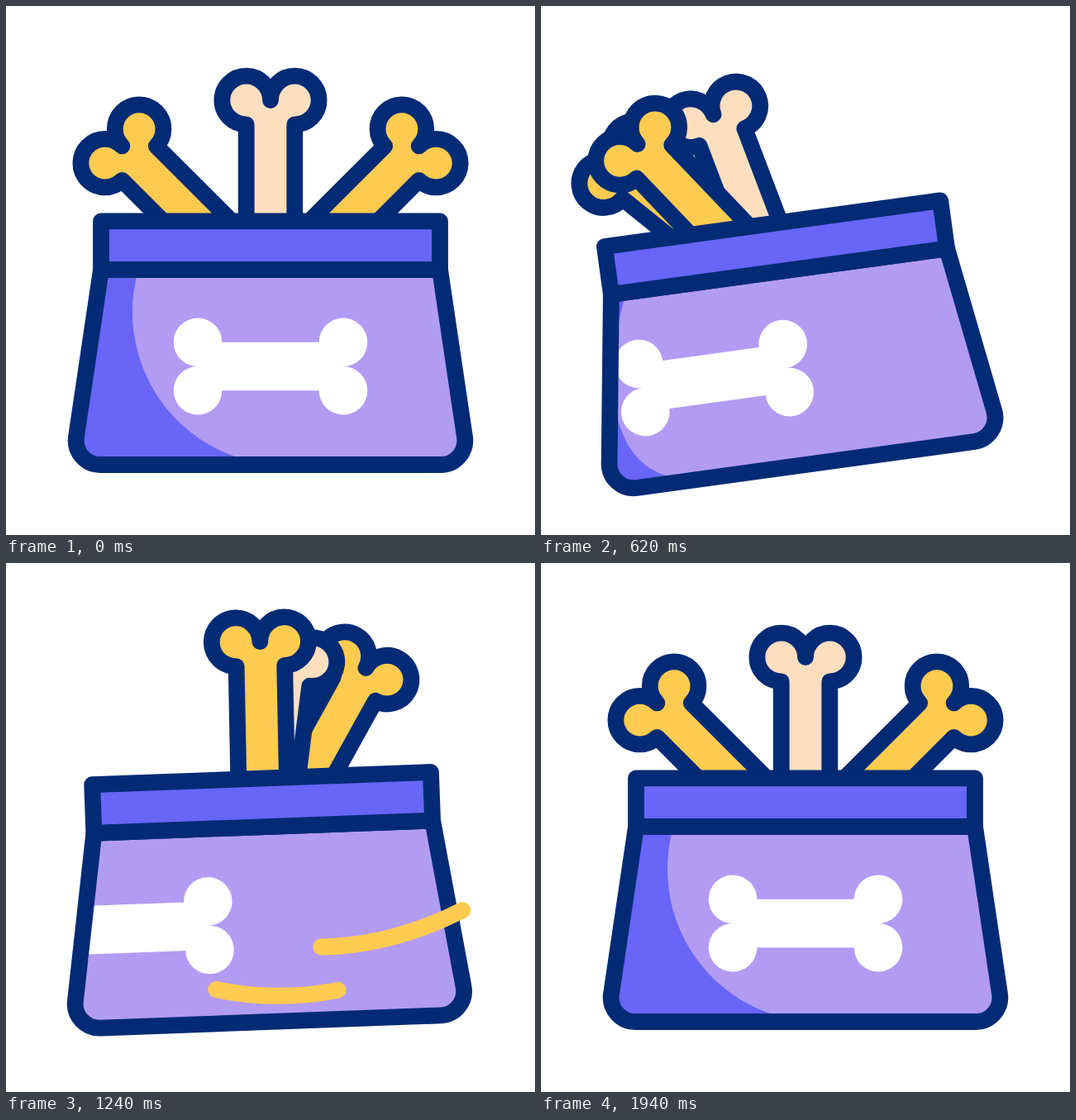
An HTML page that plays this animation: 640x640 px, repeating every 2.4 s.

```html
<!DOCTYPE html>
<html lang="en">
<head>
<meta charset="utf-8">
<title>Treat bag</title>
<style>
  html, body { margin: 0; width: 100%; height: 100%; overflow: hidden; background: #fff; }
  svg { display: block; width: 100vw; height: 100vh; }
  .line { stroke: #032b75; stroke-width: 19.8; stroke-linejoin: round; }
  .swoosh { fill: none; stroke: #fdcb50; stroke-width: 20; stroke-linecap: round; }
</style>
</head>
<body>
<svg viewBox="0 0 640 640">
  <defs>
    <path id="body" d="M115 319L85 521.4A29.3 29.3 0 0 0 114 555H526A29.3 29.3 0 0 0 555 521.4L525 319Z"/>
    <clipPath id="inside"><use href="#body"/></clipPath>
    <path id="bone" d="M-29.3 220V29.3A29.3 29.3 0 1 1 0 0A29.3 29.3 0 1 1 29.3 29.3V220Z"/>
    <g id="label" fill="#fff">
      <rect x="-88" y="-29.3" width="176" height="58.6"/>
      <circle cx="-88" cy="-29.3" r="29.3"/><circle cx="88" cy="-29.3" r="29.3"/>
      <circle cx="-88" cy="29.3" r="29.3"/><circle cx="88" cy="29.3" r="29.3"/>
    </g>
  </defs>
  <g id="bag">
    <use id="right" href="#bone" class="line" fill="#fdcb50"/>
    <use id="middle" href="#bone" class="line" fill="#fddfbf"/>
    <use id="left" href="#bone" class="line" fill="#fdcb50"/>
    <use href="#body" fill="#b29bf3"/>
    <g clip-path="url(#inside)">
      <path id="shadeOut" fill="#6865f7"/>
      <path id="shadeIn" fill="#6865f7"/>
      <use id="labelOut" href="#label"/>
      <use id="labelIn" href="#label"/>
    </g>
    <use href="#body" class="line" fill="none"/>
    <rect class="line" x="115" y="260.4" width="410" height="58.6" fill="#6865f7"/>
    <path id="swooshBig" class="swoosh"/>
    <path id="swooshSmall" class="swoosh"/>
  </g>
</svg>
<script>
const LOOP = 2400, TURN = 684;
const set = (id, name, value) => document.getElementById(id).setAttribute(name, value);
const clamp = (v, lo, hi) => Math.min(Math.max(v, lo), hi);

// Eases through key points [time, value, speed = 0].
function track(t, ...keys) {
  const i = keys.findIndex(k => k[0] > t);
  if (i < 0) return keys[keys.length - 1][1];
  const [t0, a, va = 0] = keys[i - 1], [t1, b, vb = 0] = keys[i];
  const d = t1 - t0, u = (t - t0) / d, w = 1 - u;
  return a + (b - a) * u * u * (3 - 2 * u) + d * u * w * (va * w - vb * u);
}

const swing = t => track(t, [0, 0], [580, -8.3], [973, 8.2], [1332, -4.1], [1622, 2.1], [1940, 0]);
const spin = t => track(t, [0, 0], [585, -101], [1040, 363, .95], [1240, 525, .8], [1500, TURN]);

function placeBone(id, reach, angle) {
  set(id, "transform", `translate(320 349) rotate(${angle}) translate(0 ${-reach})`);
}

// Blue area from a nearly upright back edge to a round front edge.
// Turned left, the front edge is pressed flat, most of all at its foot.
function shade(back, dx) {
  const point = (x, y) => {
    const depth = (y - 329) / 216;
    const rate = dx < 0 ? .3 + 1.03 * depth ** 2 : 1.05;
    return [x + rate * Math.max(dx, -190), y];
  };
  const top = point(157.6, 329), foot = point(277, 545);
  return `M${back} 315L${back + 8} 535L${back + 4} 558H${foot[0] + 25}L${foot}` +
    `C${point(188, 514)} ${point(136.8, 421)} ${top}V315Z`;
}

// Part of a parabola whose lowest point (centre, low) travels right.
function swoosh(tail, head, centre, low) {
  if (tail >= head) return "";
  const bend = .00138;
  const y = x => low - bend * (x - centre) ** 2;
  const mid = (tail + head) / 2;
  const handle = y(mid) + bend * (head - tail) ** 2 / 4;
  return `M${tail} ${y(tail)}Q${mid} ${handle} ${head} ${y(head)}`;
}

function draw(t) {
  set("bag", "transform", `rotate(${swing(t)} 320 555)`);
  placeBone("left", 254, track(t, [0, -45], [505, -53], [960, 53], [1500, -45]));
  placeBone("middle", 235, track(t, [0, 0], [510, -22], [930, 30], [1425, 0]));
  placeBone("right", 254, track(t, [0, 45], [740, -50], [1400, 45]));

  const dx = spin(t);
  set("shadeOut", "d", shade(dx + 27, dx));
  set("shadeIn", "d", shade(-200, dx - TURN));
  set("labelOut", "transform", `translate(${320 + dx} 436)`);
  set("labelIn", "transform", `translate(${320 + dx - TURN} 436)`);

  // Heads run evenly; tails let go later and speed up.
  const run = (t - 1040) / 200, pull = Math.max(run, 0) ** 2;
  const centre = 275 + 115 * run;
  set("swooshBig", "d", swoosh(126 + 256 * pull, clamp(356 + 200 * run, 126, 560), centre, 467));
  set("swooshSmall", "d", swoosh(165 + 90 * pull, clamp(211 + 191 * run, 165, 450), centre - 46, 524.5));
}

function frame() {
  draw(performance.now() % LOOP);
  requestAnimationFrame(frame);
}
frame();
</script>
</body>
</html>
```
